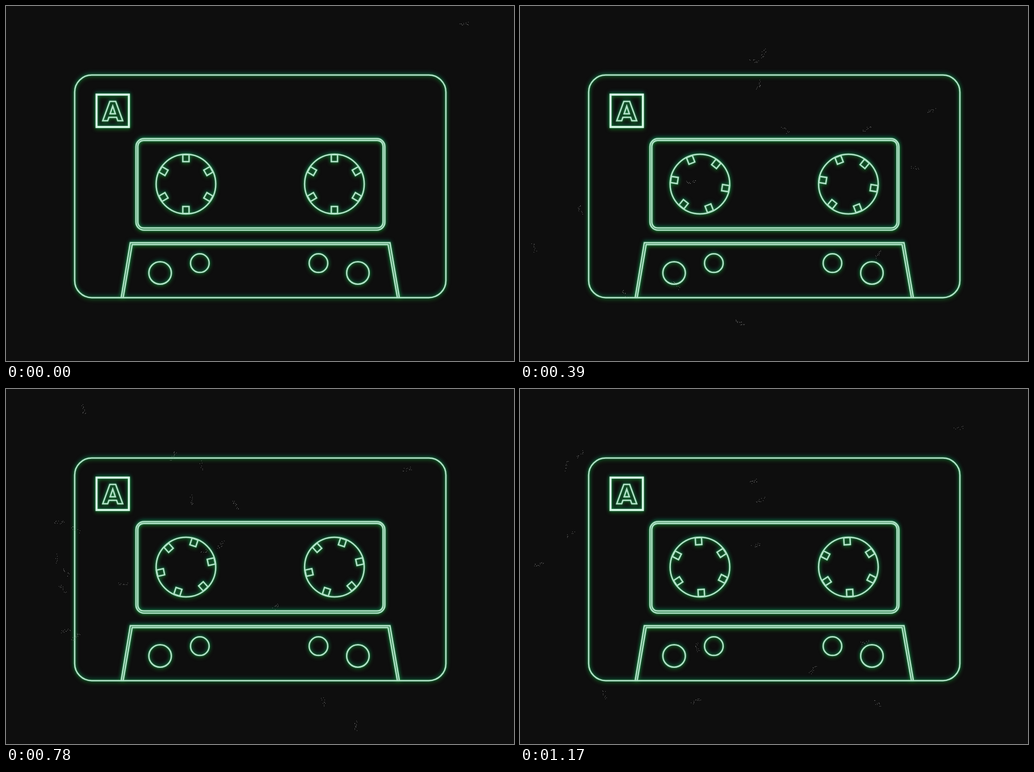
Write an HTML page that moves like this. It is 895 by 625 pixels and loops after 1.2 s.

```html
<!DOCTYPE html>
<html lang="en">
<head>
<meta charset="utf-8">
<title>Neon cassette</title>
<style>
html, body { margin: 0; width: 100%; height: 100%; overflow: hidden; background: #0e0e0e; }
svg { display: block; width: 100vw; height: 100vh; }
.neon { fill: none; stroke: #b2e2c8; stroke-width: 2.5; }
.badge { stroke: #d8fae8; stroke-width: 3.6; }
text { font: bold 46px "DejaVu Sans", sans-serif; text-anchor: middle; }
</style>
</head>
<body>
<svg viewBox="0 0 895 625">
  <defs>
    <filter id="glow" filterUnits="userSpaceOnUse" x="90" y="90" width="715" height="455" color-interpolation-filters="sRGB">
      <feGaussianBlur in="SourceAlpha" stdDeviation="3.6" result="soft"/>
      <feOffset in="soft" dy="-2" result="up"/>
      <feFlood flood-color="#0a8468" flood-opacity=".75"/>
      <feComposite in2="up" operator="in" result="teal"/>
      <feOffset in="soft" dy="2" result="down"/>
      <feFlood flood-color="#1a8c1e" flood-opacity=".75"/>
      <feComposite in2="down" operator="in" result="green"/>
      <feGaussianBlur in="SourceAlpha" stdDeviation="1.5" result="near"/>
      <feFlood flood-color="#24904c" flood-opacity=".8"/>
      <feComposite in2="near" operator="in" result="halo"/>
      <feGaussianBlur in="SourceGraphic" stdDeviation=".6" result="core"/>
      <feMerge>
        <feMergeNode in="teal"/><feMergeNode in="green"/>
        <feMergeNode in="halo"/><feMergeNode in="core"/>
      </feMerge>
    </filter>
    <g id="teeth"></g>
  </defs>
  <rect width="895" height="625" fill="#0e0e0e"/>
  <g class="neon" filter="url(#glow)">
    <rect x="121" y="121.5" width="654" height="392" rx="30"/>
    <rect class="badge" x="159.5" y="156" width="57" height="57"/>
    <text x="188" y="201.5">A</text>
    <rect x="229" y="233.5" width="438.5" height="161" rx="14"/>
    <rect x="232.3" y="236.8" width="432" height="154" rx="10"/>
    <path d="M203 513L219 416.7H676.5L693 513M206.5 513L222.3 420H673.2L689.5 513"/>
    <circle cx="271.5" cy="470" r="19.8"/>
    <circle cx="341.5" cy="452.7" r="16.4"/>
    <circle cx="550.5" cy="452.7" r="16.4"/>
    <circle cx="620" cy="470" r="19.8"/>
    <circle cx="317" cy="313.5" r="52.5"/>
    <circle cx="578.6" cy="313.5" r="52.5"/>
    <use class="reel" href="#teeth" x="317" y="313.5"/>
    <use class="reel" href="#teeth" x="578.6" y="313.5"/>
  </g>
  <path id="dust" fill="none" stroke="#9a9a9a" stroke-opacity=".6"/>
</svg>
<script>
const LOOP = 1200, STEP = 30, FLASH_EVERY = 13;
const teeth = document.getElementById("teeth");
const dust = document.getElementById("dust");
const reels = document.querySelectorAll(".reel");

for (let a = 0; a < 360; a += 60) {
  teeth.insertAdjacentHTML("beforeend",
    `<rect x="-5.5" y="-51.8" width="11" height="12.3" transform="rotate(${a})"/>`);
}

function noise(n) {
  const v = Math.sin(n * 12.9898) * 43758.5453;
  return v - Math.floor(v);
}

// A broken, jittery hairline about 18 px long
function scratch(seed) {
  const x = 14 + noise(seed) * 860, y = 28 + noise(seed + .3) * 570;
  const a = noise(seed + .6) * Math.PI, cos = Math.cos(a), sin = Math.sin(a);
  let d = "";
  for (let i = -9; i < 9; i++) {
    const n = noise(seed + i * 3.7);
    if (n < .4) continue;
    const off = (n - .7) * 10;
    d += `M${Math.round(x + cos * i - sin * off)} ${Math.round(y + sin * i + cos * off) + .5}h1`;
  }
  return d;
}

// Dust flashes for one tick at a time, most densely mid-loop
function dustPath(tick) {
  if (tick % FLASH_EVERY) return "";
  const count = Math.round(1 + 18 * Math.sin(tick * .06));
  return Array.from({ length: count }, (_, i) => scratch(tick * 31 + i * 7 + 1)).join("");
}

function draw(time) {
  const tick = Math.floor(time % LOOP / STEP);
  for (const reel of reels) {
    const x = reel.getAttribute("x"), y = reel.getAttribute("y");
    reel.setAttribute("transform", `rotate(${tick * 3} ${x} ${y})`);
  }
  dust.setAttribute("d", dustPath(tick));
}

let start;
function loop(now) {
  start ??= now;
  draw(now - start);
  requestAnimationFrame(loop);
}
draw(0);
requestAnimationFrame(loop);
</script>
</body>
</html>
```
